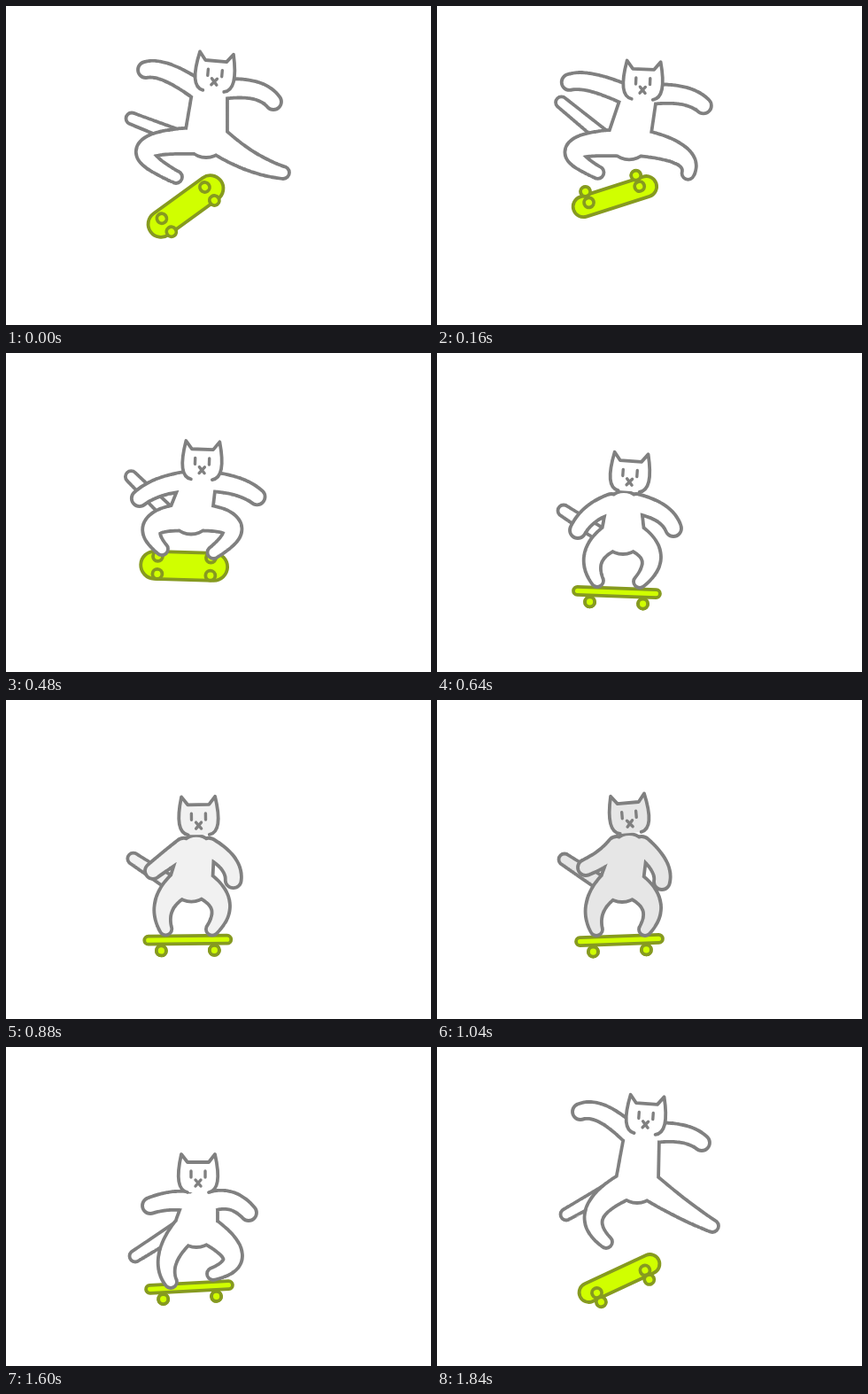
Recreate the animation shown at these times as an HTML page with a canvas. Size 480 by 360 pixels, loop 1.92 s.

```html
<!DOCTYPE html>
<html lang="en">
<head>
<meta charset="utf-8">
<title>Skating cat</title>
<style>
  html, body { margin: 0; width: 100%; height: 100%; overflow: hidden; background: #fff; }
  canvas { display: block; }
</style>
</head>
<body>
<canvas id="stage" width="480" height="360"></canvas>
<script>
const LOOP = 1920, STEP = 80, LINE = 3.8;
const ctx = document.getElementById('stage').getContext('2d');

// Key poses. head: x, y, tilt. board: x, y, tilt, roll (180 is wheels up).
// spine: chest, pelvis. arms: elbow, hand and legs: knee, foot, left side first. tail: tip.
const poses = [
  { time: 0, shade: [255], head: [236, 76, 5], board: [203, 226, -36, 68], spine: [230, 100, 226, 147],
    arms: [182, 75, 158, 72, 280, 95, 302, 108], legs: [158, 163, 192, 193, 276, 175, 313, 188], tail: [142, 127] },
  { time: 320, shade: [255], head: [227, 102, 0], board: [200, 211, 1, 180], spine: [224, 119, 208, 155],
    arms: [172, 110, 145, 114, 272, 115, 298, 123], legs: [155, 164, 171, 186, 271, 165, 247, 191], tail: [140, 102] },
  { time: 640, shade: [255], head: [218, 136, 4], board: [203, 270, 2, 0], spine: [211, 176, 210, 203],
    arms: [174, 182, 159, 200, 253, 181, 267, 198], legs: [177, 230, 181, 257, 242, 231, 229, 258], tail: [143, 178] },
  { time: 1040, shade: [230], head: [217, 130, -5], board: [206, 271, -2, 0], spine: [217, 171, 209, 204],
    arms: [188, 178, 168, 189, 250, 186, 254, 205], legs: [179, 233, 180, 259, 242, 232, 235, 259], tail: [144, 180] },
  { time: 1280, shade: [223], head: [207, 168, -8], board: [206, 272, -1, 0], spine: [216, 204, 212, 223],
    arms: [178, 203, 160, 206, 260, 196, 273, 207], legs: [172, 242, 182, 261, 247, 245, 232, 260], tail: [135, 207] },
  { time: 1600, shade: [255], head: [217, 144, 0], board: [207, 271, -3, 0], spine: [219, 180, 215, 202],
    arms: [184, 174, 163, 179, 255, 174, 274, 187], legs: [183, 238, 186, 265, 256, 236, 234, 256], tail: [146, 236] },
  { time: 1840, shade: [255], head: [236, 78, 4], board: [206, 261, -25, 35], spine: [231, 103, 226, 152],
    arms: [186, 75, 162, 73, 277, 98, 299, 108], legs: [178, 188, 191, 220, 276, 182, 311, 202], tail: [146, 189] }
];
const COUNT = poses.length;
const poseAt = n => poses[(n + COUNT) % COUNT];
const timeAt = n => poseAt(n).time + LOOP * Math.floor(n / COUNT);
const radians = degrees => degrees * Math.PI / 180;

// Smooth blend between poses that never overshoots a key value.
function blend(part, n, time) {
  const around = [n - 1, n, n + 1, n + 2];
  const t = around.map(timeAt), lists = around.map(k => poseAt(k)[part]);
  const span = t[2] - t[1], u = (time - t[1]) / span;
  const tangent = (a, b) => a * b > 0 ? 2 * a * b / (a + b) * span : 0;
  return lists[1].map((from, i) => {
    const rate = k => (lists[k + 1][i] - lists[k][i]) / (t[k + 1] - t[k]);
    const m0 = tangent(rate(0), rate(1)), m1 = tangent(rate(1), rate(2));
    const change = lists[2][i] - from;
    return from + u * (m0 + u * (3 * change - 2 * m0 - m1 + u * (m0 + m1 - 2 * change)));
  });
}

function paint(path) {
  ctx.fill(path);
  ctx.stroke(path);
}

// Tapered limb bending through its joint: overlapping discs from r1 to r2.
function addLimb(path, [x1, y1, mx, my, x2, y2], r1, r2, grow) {
  for (let i = 0; i <= 50; i++) {
    const t = i / 50, a = (1 - t) * (1 - 2 * t), b = 4 * t * (1 - t), c = t * (2 * t - 1);
    const x = a * x1 + b * mx + c * x2, y = a * y1 + b * my + c * y2;
    const r = r1 + (r2 - r1) * t + grow;
    path.moveTo(x + r, y);
    path.arc(x, y, r, 0, 2 * Math.PI);
  }
}

// One outline round all limbs: a wide dark shape with a narrower light one on top.
function drawLimbs(limbs, fill) {
  for (const [color, grow] of [['#808080', LINE / 2], [fill, -LINE / 2]]) {
    const path = new Path2D();
    for (const [points, r1, r2] of limbs) addLimb(path, points, r1, r2, grow);
    ctx.fillStyle = color;
    ctx.fill(path);
  }
}

const straight = (x1, y1, x2, y2) => [x1, y1, (x1 + x2) / 2, (y1 + y2) / 2, x2, y2];

function drawBoard([x, y, tilt, roll]) {
  const across = Math.sin(radians(roll)), down = Math.cos(radians(roll));
  const thick = 9 + 22 * across;
  ctx.save();
  ctx.translate(x, y);
  ctx.rotate(radians(tilt));
  ctx.fillStyle = '#d0ff00';
  ctx.strokeStyle = '#869a20';
  ctx.lineWidth = LINE;
  const deck = new Path2D();
  deck.roundRect(-49, -thick / 2, 98, thick, thick / 2);
  paint(deck);
  for (const end of [-30, 30]) for (const side of [-10, 10]) {
    const wheel = new Path2D();
    wheel.arc(end, 12 * down + side * across, 5.5, 0, 2 * Math.PI);
    paint(wheel);
  }
  ctx.restore();
}

function drawHead([x, y, tilt], fill) {
  ctx.save();
  ctx.translate(x, y);
  ctx.rotate(radians(tilt));
  ctx.fillStyle = fill;
  ctx.strokeStyle = '#808080';
  ctx.lineWidth = LINE;
  paint(new Path2D('M-12 20Q-28 17-19-23L-12-14H12L19-23Q28 17 12 20'));
  ctx.lineWidth = 3.4;
  ctx.stroke(new Path2D('M-8-4V3M8-4V3M-3 6L3 13M3 6L-3 13'));
  ctx.restore();
}

function drawCat(get) {
  const fill = `rgb(${Array(3).fill(Math.round(get('shade')[0]))})`;
  const [cx, cy, px, py] = get('spine'), arms = get('arms'), legs = get('legs');
  drawLimbs([[straight(px - 22, py + 4, ...get('tail')), 8, 6.5]], fill);
  const limbs = [[straight(cx, cy, px, py), 20, 24]];
  for (const [side, i] of [[-1, 0], [1, 4]]) {
    limbs.push([[cx + 14 * side, cy - 6, ...arms.slice(i, i + 4)], 11, 9]);
    limbs.push([[px + 13 * side, py + 5, ...legs.slice(i, i + 4)], 15, 7]);
  }
  drawLimbs(limbs, fill);
  drawHead(get('head'), fill);
}

function draw(now) {
  const time = Math.floor(now % LOOP / STEP) * STEP;
  const n = poses.findLastIndex(pose => pose.time <= time);
  const get = part => blend(part, n, time);
  ctx.fillStyle = '#fff';
  ctx.fillRect(0, 0, 480, 360);
  ctx.lineCap = ctx.lineJoin = 'round';
  drawBoard(get('board'));
  drawCat(get);
}

let start;
function tick(now) {
  start ??= now;
  draw(now - start);
  requestAnimationFrame(tick);
}
draw(0);
requestAnimationFrame(tick);
</script>
</body>
</html>
```
